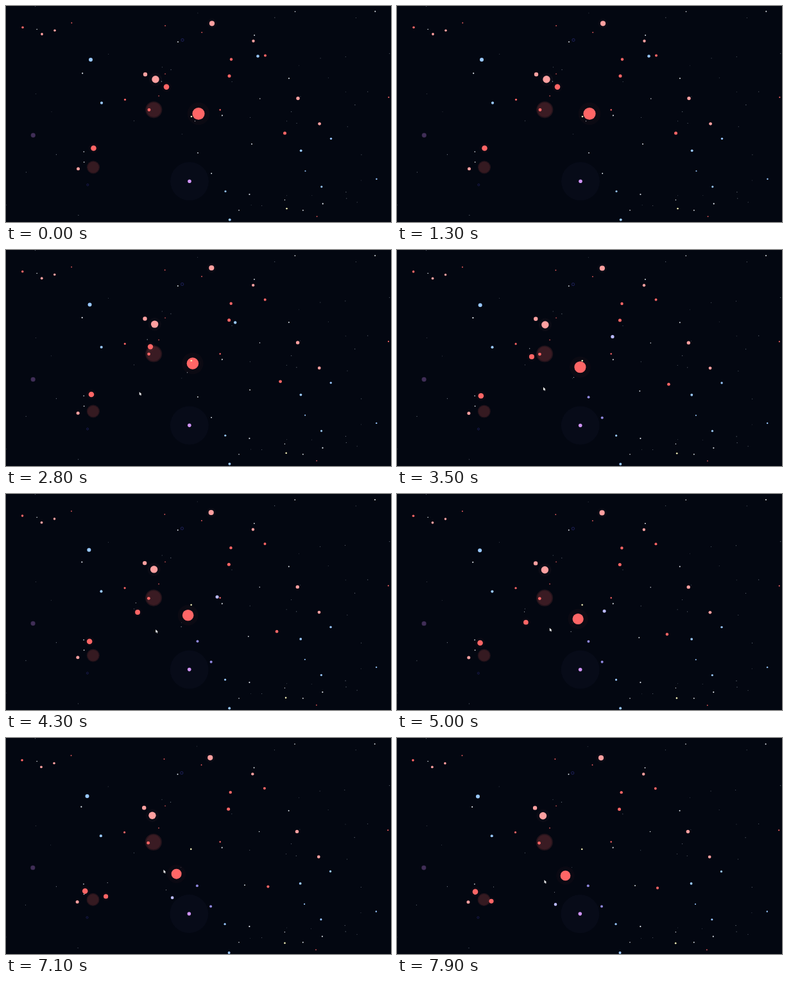
Animation of 600x338 px, one loop 8 s. Source, as an HTML page with a canvas:

```html
<!DOCTYPE html>
<html>
<head>
<meta charset="utf-8">
<style>
html, body { margin: 0; width: 100%; height: 100%; overflow: hidden; background: #030711; }
canvas { display: block; width: 600px; height: 338px; }
</style>
</head>
<body>
<canvas></canvas>
<script>
const W = 600, H = 338, LOOP = 8000, STEP = 100;
const RED = '#ff6666', PINK = '#ffa0a0', BLUE = '#99c8ff', WHITE = '#e8eef5', DUST = '#69717d';
const canvas = document.querySelector('canvas');
const ctx = canvas.getContext('2d');
const ratio = window.devicePixelRatio || 1;
canvas.width = W * ratio;
canvas.height = H * ratio;
ctx.scale(ratio, ratio);

// A star is x, y, radius and, for near ones, how far the flight carries it
const bright = {
  [RED]: [
    [26, 33.5, 1.8], [351, 83.5, 2.2], [348, 109.5, 2.5], [404, 77.4, 2],
    [185.5, 146.5, 1.6], [223, 162.5, 2.4], [136.5, 222.5, 4.3, 14.5],
    [434.5, 199, 2.5, 28.5], [250, 126.6, 4.3, 103], [300, 168.5, 9.6, 37.5]],
  [PINK]: [
    [56, 44, 1.9], [76, 38.3, 1.8], [385.5, 54.8, 2.2], [217, 107, 3.2], [455, 144.5, 2.7],
    [488.6, 184.3, 2.4], [112.5, 254.8, 2.5], [321, 27.3, 4.1, 3], [233, 114.8, 5.7, 5.5]],
  [BLUE]: [
    [149, 151.7, 2.1], [459.7, 226.3, 1.9], [506.5, 207.6, 1.7], [491.8, 282.8, 1.6],
    [342, 290, 1.6], [348.7, 334.5, 2], [132, 84, 3, 6]],
  [WHITE]: [[242.5, 118, .6, 92], [294.5, 180, .6, 49], [383, 216, .9, 12]]
};

let seed = 7;
const random = () => (seed = seed * 16807 % 2147483647) / 2147483647;
const scatter = (count, color, r) => Array.from({ length: count }, () =>
  [color, [random() * W, random() * H, r * (.8 + .4 * random()), 2 * random() ** 2]]);
const faint = [
  ...scatter(40, DUST, .55), ...scatter(16, WHITE, .9), ...scatter(8, RED, 1), ...scatter(2, BLUE, 1.1)
];

// Time, then one or two coordinates
const flight = [[1640, 0], [3500, .389], [5000, .477], [7500, 1]];
const pointerPath = [[1700, 176, 234], [3500, 228, 214.5], [5800, 243, 207], [7100, 245.5, 206], [7900, 229.5, 222]];

const clamp = v => Math.min(1, Math.max(0, v));

function at(keys, t, column = 1) {
  let value = keys[0][column];
  for (let i = 1; i < keys.length; i++) {
    const a = keys[i - 1], b = keys[i];
    value += (b[column] - a[column]) * clamp((t - a[0]) / (b[0] - a[0]));
  }
  return value;
}

let shiftX = 0, shiftY = 0;

function disc(color, [x, y, r, near = .6 * r], alpha = 1, ring = false) {
  const size = near > 20 ? r * (1 - .18 * shiftY) : r;
  ctx.beginPath();
  ctx.arc(x - near * shiftX, y + 1.25 * near * shiftY, size, 0, 2 * Math.PI);
  ctx.globalAlpha = alpha;
  ctx.fillStyle = ctx.strokeStyle = color;
  if (ring) ctx.stroke(); else ctx.fill();
  ctx.globalAlpha = 1;
}

function star(color, [x, y, r, near]) {
  if (r > 4) disc(color, [x, y, 1.82 * r, near], .03);
  disc(color, [x, y, r, near]);
}

function nebula(color, x, y, r, alpha) {
  disc(color, [x, y, 1.16 * r, .5], alpha);
  disc(color, [x, y, r, .5], alpha * .8);
}

function pointer(x, y) {
  ctx.beginPath();
  [[0, 0], [0, 5.2], [1.2, 4.2], [2.2, 6], [3.1, 5.5], [2.3, 3.8], [3.8, 3.7]]
    .forEach(([dx, dy]) => ctx.lineTo(x + dx, y + dy));
  ctx.fillStyle = '#eeeeee';
  ctx.fill();
}

function draw(t) {
  shiftX = at(flight, t);
  shiftY = clamp((t - 1700) / 5730);
  ctx.fillStyle = '#030711';
  ctx.fillRect(0, 0, W, H);

  disc('#8888ff', [286, 274.3, 30, .7], .03);
  nebula(RED, 230.3, 162.3, 11.3, .13);
  nebula(RED, 136, 252.3, 8.7, .12);
  nebula('#b078d8', 42.3, 202.3, 3.2, .22);
  ctx.lineWidth = .9;
  disc('#232567', [275, 53.2, 2.1], 1, true);
  disc('#1c1d55', [127.3, 279.8, 1.5], 1, true);

  faint.forEach(([color, s]) => disc(color, s));
  for (const color in bright) bright[color].forEach(s => star(color, s));
  disc('#f2f0b8', [437.5, 317, 1.3, 3.3]);
  disc('#f2f0b8', [289, 173, 1.3]);

  // These three turn violet and swell during the flight
  const late = t >= 2850;
  disc(late ? '#bbbbff' : BLUE, [392.5, 78.5, late ? 2.8 : 2.3, 145.5]);
  for (const [x, y] of [[299, 229.8], [320.2, 262]])
    disc(late ? '#9088e0' : WHITE, [x, y, late ? 2 : .9]);
  disc('#d094f8', [286, 274.2, 2.8, .7]);

  if (t >= 1700) pointer(at(pointerPath, t, 1), at(pointerPath, t, 2));
}

const start = performance.now();
function frame() {
  const t = (performance.now() - start) % LOOP;
  draw(Math.floor(t / STEP) * STEP);
  requestAnimationFrame(frame);
}
frame();
</script>
</body>
</html>
```
